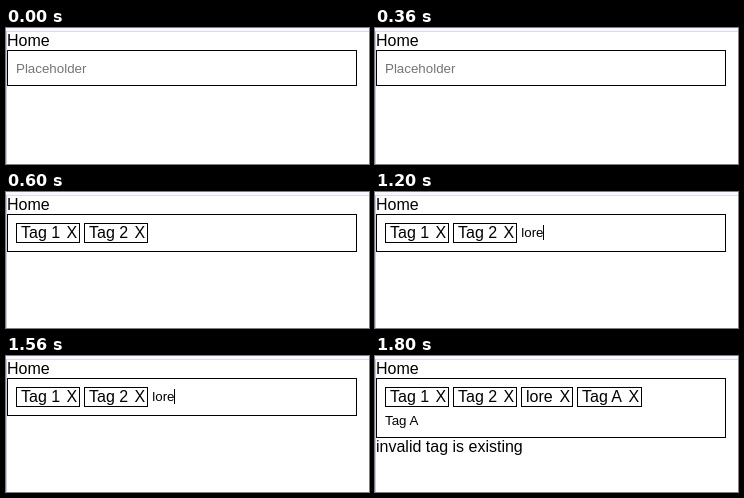
Write an HTML page that moves like this. It is 363 by 136 pixels and loops after 2400 ms.

```html
<!DOCTYPE html>
<html lang="en">
<head>
<meta charset="utf-8">
<title>Tag input</title>
<style>
  html, body { margin: 0; height: 100%; overflow: hidden; background: #fff; }
  svg { display: block; font: 16px "Liberation Sans", Arial, sans-serif; }
  .box { fill: none; stroke: #000; }
  .small { font-size: 13.333px; }
  .hint { fill: #757575; }
</style>
</head>
<body>
<svg width="363" height="136">
  <rect width="363" height="3" fill="#f8f8ff"/>
  <rect y="3" width="363" height="1" fill="#dcdcf0"/>
  <rect y="3" width="1" height="133" fill="#cbc6ec"/>
  <text x="1" y="18">Home</text>
  <g id="field"></g>
</svg>
<script>
const STEP = 600;
const field = document.getElementById('field');

const text = (x, y, str, cls = '') => `<text x="${x}" y="${y}" class="${cls}">${str}</text>`;
const box = (x, y, w, h) =>
  `<rect class="box" x="${x + .5}" y="${y + .5}" width="${w - 1}" height="${h - 1}"/>`;
const frame = height => box(1, 22, 350, height);
const tag = (x, w, label) =>
  box(x, 31, w, 20) + text(x + 5, 46, label) + text(x + w - 13.5, 46, 'X');

const twoTags = tag(10, 64, 'Tag 1') + tag(78, 64, 'Tag 2');
const caret = '<rect x="168" y="33" width="1" height="15"/>';

const states = [
  frame(36) + text(10, 45, 'Placeholder', 'small hint'),
  frame(38) + twoTags,
  frame(38) + twoTags + text(146.3, 45, 'lore', 'small') + caret,
  frame(60) + twoTags + tag(146, 52, 'lore') + tag(202, 65, 'Tag A') +
    text(10, 69, 'Tag A', 'small') + text(1, 96, 'invalid tag is existing')
];

const start = performance.now();
let shown = -1;
function draw() {
  const now = Math.floor((performance.now() - start) / STEP) % states.length;
  if (now !== shown) field.innerHTML = states[shown = now];
  requestAnimationFrame(draw);
}
draw();
</script>
</body>
</html>
```
